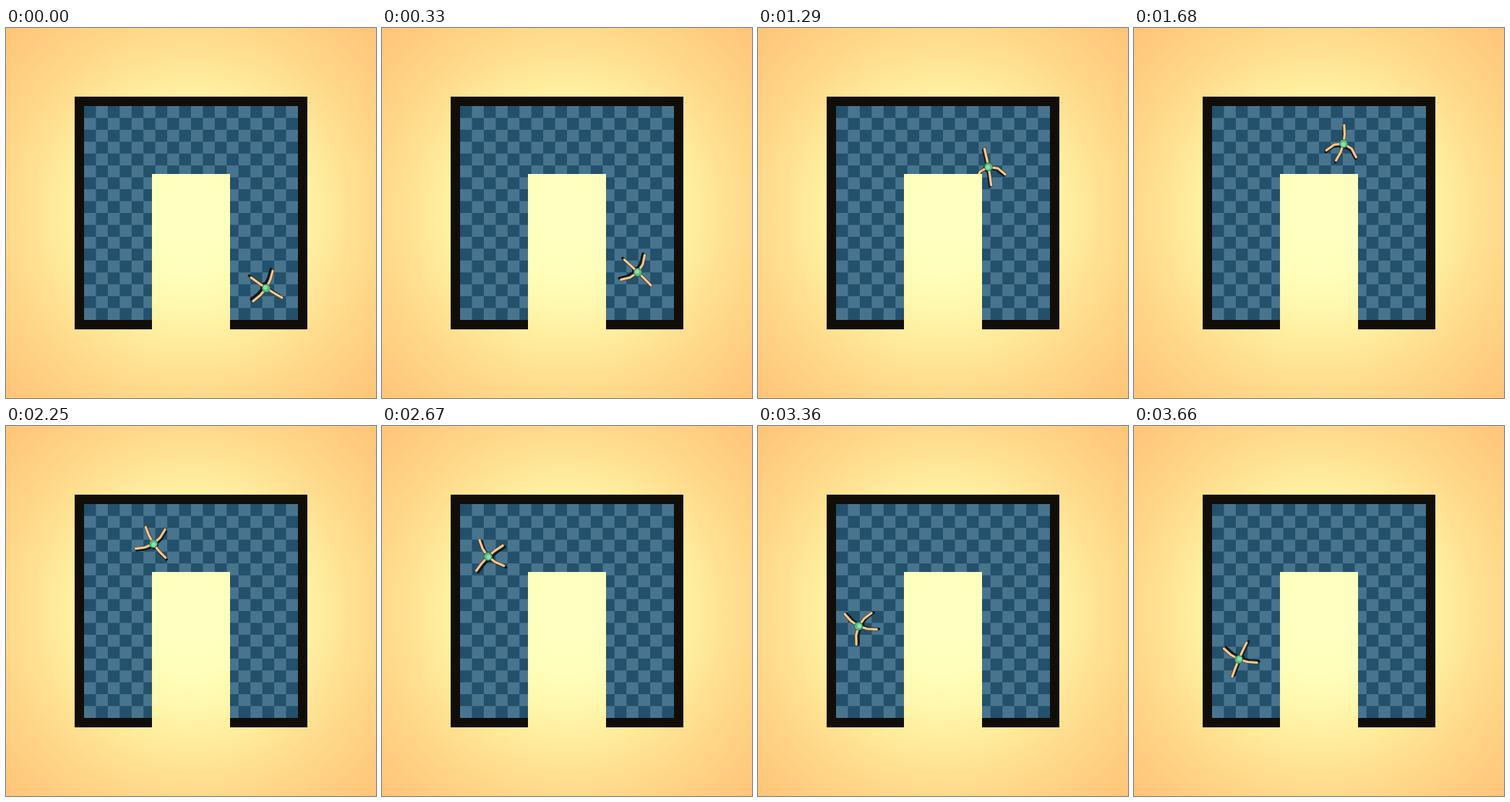
These frames come from a looping animation (512 px wide and 512 px high, 3.69 s). An HTML page with a canvas:

```html
<!DOCTYPE html>
<html lang="en">
<head>
<meta charset="utf-8">
<title>Walker in a U-shaped room</title>
<style>
  html, body { margin: 0; width: 100%; height: 100%; overflow: hidden; background: #ffc87c; }
  canvas { display: block; width: 512px; height: 512px; }
</style>
</head>
<body>
<canvas id="stage" width="512" height="512"></canvas>
<script>
const SIZE = 512, LOOP = 3690, STEP = 30, MID = 256;
const FLOOR = 108, SPAN = 296, CELLS = 18;
const REACH = 25.5, BEND = -.1, SHADOW = .025;
const ctx = document.getElementById('stage').getContext('2d');

// time, x, y
const PATH = [
  [0, 360, 360], [330, 354, 338], [600, 357, 292], [900, 347, 237], [1080, 332, 214],
  [1680, 290, 160], [2250, 204, 163], [2700, 144, 183], [3060, 135.5, 232], [3660, 145, 323]
];

// time, body turn, swing of each diagonal pair of legs (degrees)
const POSE = [
  [0, -12, 2, 12], [330, -1, -1, 22], [900, 15, 5, -23], [1680, 58, -11, -34],
  [2250, 102, -18, 8], [3060, 75, 27, 17], [3660, 68, 2, 13]
];

function slope(keys, i, c) {
  const a = keys[Math.max(0, i - 1)], b = keys[Math.min(keys.length - 1, i + 1)];
  return (b[c] - a[c]) / (b[0] - a[0]);
}

// smooth curve through the keys, returns all columns after the time
function follow(keys, t) {
  let i = 0;
  while (i < keys.length - 2 && t >= keys[i + 1][0]) i++;
  const a = keys[i], b = keys[i + 1], span = b[0] - a[0];
  const u = Math.min(1, (t - a[0]) / span), v = 1 - u;
  return a.map((from, c) => from * (1 + 2 * u) * v * v + b[c] * u * u * (3 - 2 * u)
    + span * u * v * (v * slope(keys, i, c) - u * slope(keys, i + 1, c))).slice(1);
}

// opposite legs swing against each other; the knee lags behind the swing
function legsAt(t) {
  const [turn, p, q] = follow(POSE, t);
  return [p, -q, -p, q].map((swing, n) => {
    const a = (225 + 90 * n + turn + swing) * Math.PI / 180;
    const dx = Math.cos(a), dy = Math.sin(a), bend = swing * BEND;
    return {
      knee: [dx * REACH / 2 - dy * bend, dy * REACH / 2 + dx * bend],
      foot: [dx * REACH, dy * REACH]
    };
  });
}

function makeGlow() {
  const glow = ctx.createRadialGradient(MID, MID, 0, MID, MID, 362);
  [[0, '#ffffc2'], [.22, '#ffffbc'], [.36, '#fff8ae'], [.48, '#ffee9f'],
   [.6, '#ffe293'], [.74, '#ffd688'], [1, '#ffc478']].forEach(s => glow.addColorStop(...s));
  return glow;
}
const GLOW = makeGlow();

function box(x, y, w, h, fill) {
  ctx.fillStyle = fill;
  ctx.fillRect(x, y, w, h);
}

function drawRoom() {
  const cell = SPAN / CELLS;
  box(0, 0, SIZE, SIZE, GLOW);
  box(95, 95, 322, 322, '#110d09');
  box(FLOOR, FLOOR, SPAN, SPAN, '#23506b');
  for (let r = 0; r < CELLS; r++) {
    for (let c = (r + 1) % 2; c < CELLS; c += 2) {
      box(FLOOR + c * cell, FLOOR + r * cell, cell, cell, '#48748e');
    }
  }
}

function strokeLegs(legs, width, color) {
  ctx.lineWidth = width;
  ctx.strokeStyle = color;
  ctx.beginPath();
  for (const { knee, foot } of legs) {
    ctx.moveTo(0, 0);
    ctx.lineTo(...knee);
    ctx.lineTo(...foot);
  }
  ctx.stroke();
}

function disc(x, y, r, fill) {
  ctx.fillStyle = fill;
  ctx.beginPath();
  ctx.arc(x, y, r, 0, 2 * Math.PI);
  ctx.fill();
}

function drawWalker(t) {
  const [x, y] = follow(PATH, t), legs = legsAt(t);
  const sx = (MID - x) * SHADOW, sy = (MID - y) * SHADOW;
  ctx.save();
  ctx.lineCap = ctx.lineJoin = 'round';
  ctx.translate(x + sx, y + sy);
  strokeLegs(legs, 3.8, '#0b1a24');
  disc(0, 0, 5.5, '#0b1a24');
  ctx.translate(-sx, -sy);
  strokeLegs(legs, 4.4, '#4a3420');
  strokeLegs(legs, 3.1, '#f5c98e');
  disc(0, 0, 6, '#2f7049');
  disc(0, 0, 5.2, '#5cb981');
  disc(sx * .4, sy * .4, 3, '#8fe0ac');
  ctx.restore();
}

const start = performance.now();
function frame(now) {
  const t = Math.max(0, now - start) % LOOP;
  drawRoom();
  drawWalker(Math.floor(t / STEP) * STEP);
  box(202, 202, 108, 215, GLOW);
  requestAnimationFrame(frame);
}
frame(start);
</script>
</body>
</html>
```
